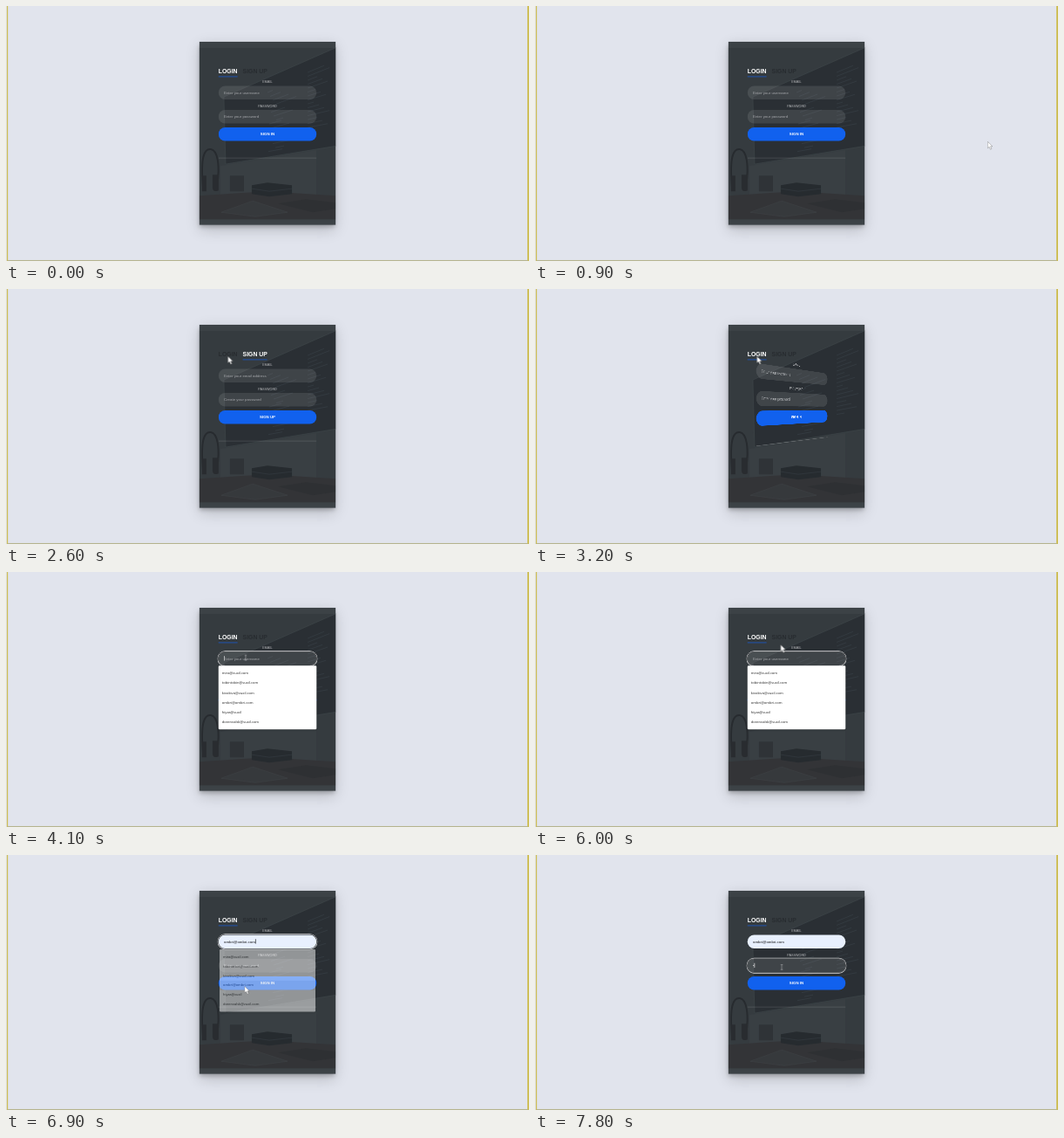
Recreate the animation shown at these times as an HTML page. Size 600 px wide and 292 px high, loop 8000 ms.

```html
<!DOCTYPE html>
<html lang="en">
<head>
<meta charset="utf-8">
<title>Login form</title>
<style>
  html, body { margin: 0; width: 100%; height: 100%; overflow: hidden; background: #e1e4ed; }
  #page { position: absolute; width: 1920px; height: 935px; transform: scale(.3125); transform-origin: 0 0;
    font: 14px "Liberation Sans", Arial, sans-serif; overflow: hidden; }
  #page div, #page svg { position: absolute; box-sizing: border-box; white-space: pre; }
  #edge { inset: 0 0 0 3px; border: solid #cdbd52; border-width: 0 6px 4px 4px; border-bottom-color: #b5b48e; }
  #card { left: 710px; top: 131px; width: 500px; height: 671px; background: #3c4246;
    box-shadow: 0 12px 15px rgba(0,0,0,.24), 0 17px 50px rgba(0,0,0,.19); }
  #card svg { left: 0; top: 0; }
  .tab { top: 224px; height: 36px; font-weight: 700; font-size: 22px; line-height: 28px;
    color: #282c30; border-bottom: 2px solid transparent; }
  .tab.on { color: #fff; border-color: #1161ee; }
  #form { left: 780px; top: 264px; width: 360px; height: 345px; perspective: 960px; }
  .panel { inset: 0; backface-visibility: hidden; }
  .label { width: 100%; height: 18px; font-size: 12px; line-height: 18px; text-align: center; color: #b9bbbd; }
  .field, .button { width: 100%; height: 49px; line-height: 49px; border-radius: 25px; }
  .field { padding-left: 20px; background: rgba(255,255,255,.1); color: #fff; }
  .field.focus { box-shadow: 0 0 0 2px #15181b, 0 0 0 4px #dcdddf; }
  .field.filled { background: #e8f0fe; color: #111; }
  .hint { color: #a5a8ab; }
  .caret { display: inline-block; width: 2px; height: 17px; margin-right: -2px; vertical-align: -3px; background: currentColor; }
  .button { top: 181px; background: #1161ee; color: #fff; font-weight: 700; text-align: center; }
  .rule { top: 292px; width: 100%; height: 2px; background: rgba(255,255,255,.2); }
  #list { left: 780px; top: 343px; width: 360px; height: 234px; padding: 10px 0; background: #fff;
    border-radius: 4px; box-shadow: 0 2px 6px rgba(0,0,0,.3); font: 13px "Open Sans", sans-serif; color: #222; }
  #list div { position: static; height: 35.8px; line-height: 35.8px; padding-left: 13px; }
  #list .hot { background: #e9eaec; }
</style>
</head>
<body>
<div id="page">
  <div id="edge"></div>
  <div id="card">
    <svg width="500" height="671" viewBox="222 41 156 209.4" preserveAspectRatio="none">
      <path fill="#353b3f" d="M222 48h156v196H222z"/>
      <path fill="#393f43" d="M246 183L356 165V218L246 216z"/>
      <path fill="#333437" d="M222 217L300 212 378 217V244H222z"/>
      <path fill="#2a2f34" stroke="#3d4448" stroke-width=".8" d="M250 104L380 47V160L252 181z"/>
      <g id="code" fill="none" stroke="#3a4249" stroke-width=".6"></g>
      <path fill="none" stroke="#272b2f" stroke-width="2" d="M226 206C223 172 228 163 235 164 243 165 246 183 242 206"/>
      <path fill="#292c30" d="M225 194h5v18h-5zM237 193h7v18q-7 3-7-4z"/>
      <path fill="#2f3337" d="M257 194h16v18h-16z"/>
      <path fill="#262b2f" d="M282 205l18-3 28 3v10l-26 3-20-3z"/>
      <path fill="none" stroke="#363d43" stroke-width=".6" d="M282 209l20 3 26-3"/>
      <path fill="#36393c" stroke="#3f4245" stroke-width=".6" d="M247 236l36-13 40 13-37 5z"/>
      <path fill="#2e3033" d="M312 226l40 10 26-4v-7l-34-4z"/>
    </svg>
  </div>
  <div class="tab" style="left:780px">LOGIN</div>
  <div class="tab" style="left:869px">SIGN UP</div>
  <div id="form"></div>
  <div id="list"></div>
  <svg id="arrow" width="24" height="32" viewBox="0 0 12 16">
    <path fill="#fff" stroke="#444" stroke-width=".5" d="M.5.5V12.5L3.4 10 5.4 14.7 7.6 13.8 5.6 9.2H9.3z"/>
  </svg>
  <svg id="beam" width="12" height="22" viewBox="-6 -11 12 22">
    <path fill="none" stroke="#c4c6c8" stroke-width="1.6" d="M-4-9H4M0-9V9M-4 9H4"/>
  </svg>
</div>
<script>
const LOOP = 8000, SCALE = 0.3125;
const CHOSEN = 'ombri@ombri.com';
const MAILS = ['mira@vuxil.com', 'tobintobin@vuxil.com', 'kivokivo@vuxil.com', CHOSEN, 'hiyas@vuxil', 'dorenvalsk@vuxil.com'];
// time, x, y of the pointer
const PATH = [
  [700, 620, 190], [1250, 287, 75], [1850, 287, 75], [2200, 246, 78], [2450, 246, 78], [2600, 254.5, 77],
  [3250, 254.5, 77], [3600, 275, 98], [4500, 275, 98], [4900, 282, 84], [5250, 282, 84], [5300, 284, 80.5],
  [5400, 281.5, 83], [6000, 281.5, 83], [6700, 273.5, 150], [7000, 273.5, 150], [7350, 283, 128.5], [8000, 283, 128.5]
];
const $ = id => document.getElementById(id);
const clamp = v => Math.max(0, Math.min(1, v));
const ramp = (t, start, length) => clamp((t - start) / length);

const panel = (mailHint, passHint, action) => `<div class="panel">
  <div class="label" style="top:5px">EMAIL</div><div class="field" style="top:29px"><span class="hint">${mailHint}</span></div>
  <div class="label" style="top:93px">PASSWORD</div><div class="field" style="top:117px"><span class="hint">${passHint}</span></div>
  <div class="button">${action}</div><div class="rule"></div></div>`;
$('form').innerHTML = panel('Enter your username', 'Enter your password', 'SIGN IN') +
  panel('Enter your email address', 'Create your password', 'SIGN UP');
$('list').innerHTML = MAILS.map(m => `<div>${m}</div>`).join('');

// faint lines of code running along the tilted screen
let code = '';
for (let i = 0; i < 32; i++) {
  const right = i % 2, x = right ? 346 : 300 + i * 7 % 11, length = 6 + i * 13 % 20;
  const y = (right ? 76 : 99) + (i >> 1) * 4.5, tilt = 0.42 - i * 0.008;
  code += `M${x} ${y}l${length} ${-length * tilt}`;
}
$('code').innerHTML = `<path d="${code}"/>`;

const tabs = document.querySelectorAll('.tab');
const panels = document.querySelectorAll('.panel');
const [mail, pass] = panels[0].querySelectorAll('.field');
const rows = [...$('list').children];

function pointer(t) {
  if (t < PATH[0][0]) return [-100, -100];
  const i = PATH.findIndex(p => p[0] > t), [t0, x0, y0] = PATH[i - 1], [t1, x1, y1] = PATH[i];
  const u = (t - t0) / (t1 - t0), e = u * u * (3 - 2 * u);
  return [x0 + (x1 - x0) * e, y0 + (y1 - y0) * e];
}

// a panel lies flat without a 3D layer, so that its text stays sharp
function turnPanel(el, angle) {
  el.style.transform = angle ? `rotateY(${angle}deg)` : 'none';
  el.style.display = angle < 90 ? '' : 'none';
}

function setField(field, value, hint, focus, caretOn, filled) {
  const caret = `<span class="caret" style="opacity:${+caretOn}"></span>`;
  const html = value + (focus ? caret : '') + (value ? '' : `<span class="hint">${hint}</span>`);
  if (field.shown !== html) field.innerHTML = field.shown = html;
  field.classList.toggle('focus', focus);
  field.classList.toggle('filled', filled);
}

function place(el, x, y, visible) {
  el.style.left = x / SCALE + 'px';
  el.style.top = y / SCALE + 'px';
  el.style.display = visible ? '' : 'none';
}

function draw(t) {
  const [x, y] = pointer(t);
  const signUp = t >= 1284 && t < 2900;
  tabs[0].classList.toggle('on', !signUp);
  tabs[1].classList.toggle('on', signUp);

  const turn = 180 * (ramp(t, 1284, 400) - ramp(t, 2900, 400));
  turnPanel(panels[0], turn);
  turnPanel(panels[1], 180 - turn);
  $('form').style.perspective = turn % 180 ? '' : 'none';

  const open = t < 3800 ? 0 : 1 - ramp(t, 6840, 120);
  const row = t > 6000 && y > 110 ? Math.floor((y / SCALE - 353) / 35.8) : -1;
  rows.forEach((el, i) => el.classList.toggle('hot', i === row));
  $('list').style.display = open ? '' : 'none';
  $('list').style.opacity = open;
  $('list').style.transform = `scale(${1 - 0.044 * (1 - open)})`;

  const value = t >= 6840 ? CHOSEN : MAILS[row] || '';
  const mailCaret = t < 4100 || t >= 6600 || Math.floor((t - 4100) / 500) % 2 === 0;
  setField(mail, value, 'Enter your username', t >= 3700 && t < 7400, mailCaret, value !== '');
  setField(pass, t >= 7700 ? '•' : '', 'Enter your password', t >= 7400, true, false);

  const overMail = t > 3300 && y > 91.5 && y < 107;
  const overPass = t > 6960 && y > 119 && y < 134.4;
  const beam = overMail || overPass;
  place($('arrow'), x, y, !beam);
  place($('beam'), x - 1.9, y - 3.4, beam);
}

function tick() {
  draw(performance.now() % LOOP);
  requestAnimationFrame(tick);
}
tick();
</script>
</body>
</html>
```
